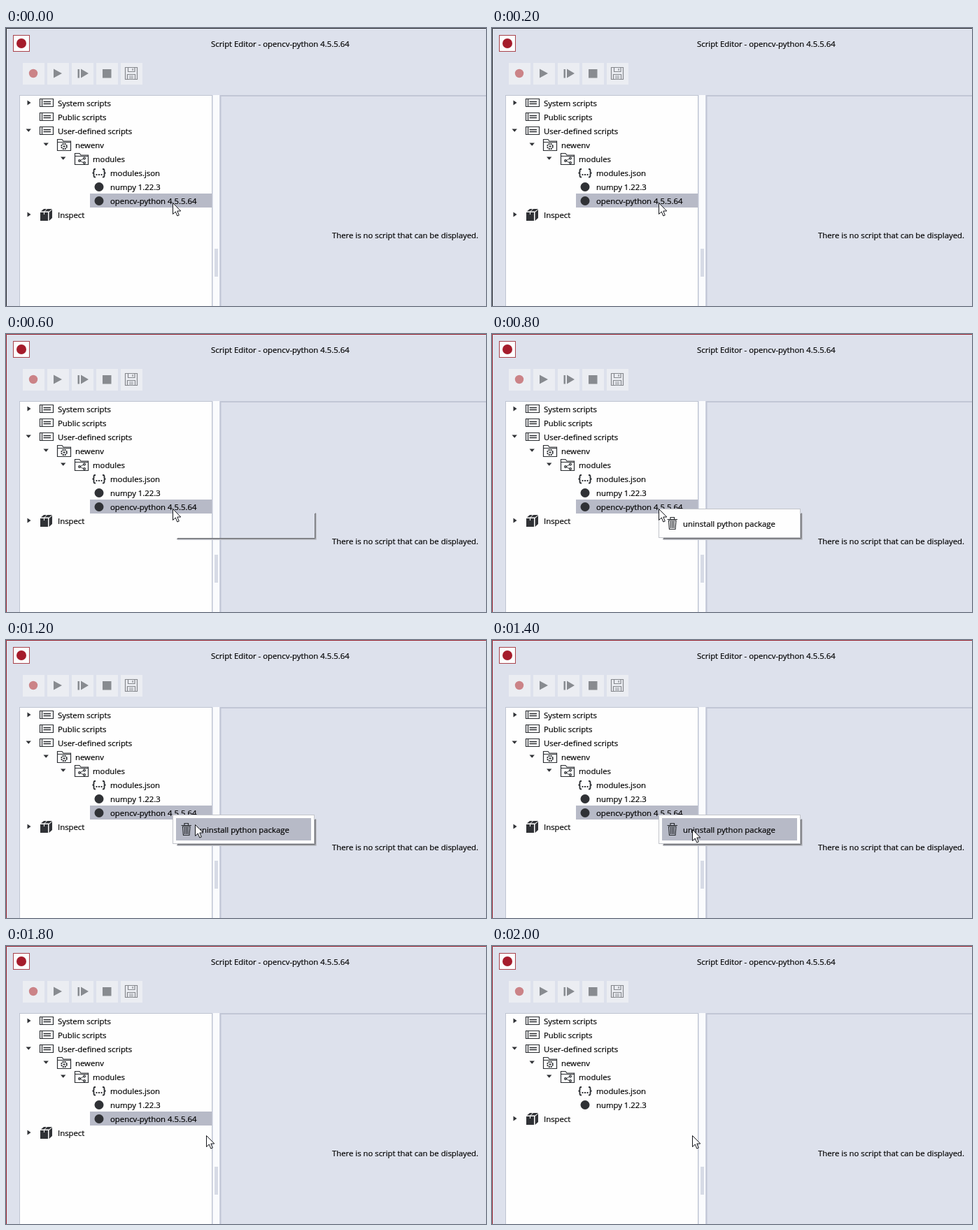
Recreate the animation shown at these times as an HTML page. Size 686 px wide and 398 px high, loop 2.4 s.

```html
<!DOCTYPE html>
<html lang="en">
<head>
<meta charset="utf-8">
<title>Script Editor</title>
<style>
html, body { margin: 0; height: 100%; overflow: hidden; background: #dde1ec; }
svg { display: block; width: 686px; height: 398px; }
text { font: 11.35px "Open Sans", "Noto Sans", sans-serif; fill: #000; stroke: #000; stroke-width: .2; white-space: pre; }
.line { fill: none; stroke: #2c2f33; stroke-width: 1.2; }
.tool { fill: #888b90; }
.dark { fill: #303236; }
</style>
</head>
<body>
<svg viewBox="0 0 686 398">
  <defs>
    <g id="card" class="line">
      <path d="M.5 .5H19.5V11.5H.5ZM3.5 .5V11.5"/>
      <path d="M5.5 4.5H16M5.5 7.5H16" stroke-width="1.4"/>
    </g>
    <g id="folder" class="line">
      <path d="M.5 16.5V.5H7L9 3H19.5V16.5ZM.5 4.5H19.5"/>
    </g>
    <path id="closed" class="dark" d="M0 0L5 3.5L0 7Z"/>
    <path id="open" class="dark" d="M0 0H7.4L3.7 4.2Z"/>
    <circle id="package" class="dark" r="6.5"/>
  </defs>

  <rect width="686" height="398" fill="#dde1ec"/>
  <path id="frame" d="M.5 398V.5H686" fill="none"/>

  <rect x="10.5" y="10.5" width="23" height="23" fill="#fdfdfd" stroke="#a8434c"/>
  <circle cx="22" cy="22" r="7" fill="#a51c2b"/>
  <text x="293" y="27">Script Editor - opencv-python 4.5.5.64</text>

  <path fill="#ebedf2" d="M24 50h31v31h-31zM59 50h31v31h-31zM94 50h31v31h-31zM129 50h31v31h-31zM164 50h31v31h-31z"/>
  <circle cx="39" cy="65" r="6.2" fill="#cb8387"/>
  <path class="tool" d="M68 58.5L80 65L68 71.500ZM102.500 59H105V71.500H102.500ZM107 58.500L118 65L107 71.500ZM138 59H150.500V71.500H138Z"/>
  <path d="M170.5 56.5H187.500V73.500H170.500ZM174.500 56.500V62.500H184V56.500M181 58V61M173.500 73.500V66.500H184.500V73.500M176 69H182M176 71.500H182" fill="none" stroke="#85888d" stroke-width="1.2"/>

  <rect x="19.5" y="96.5" width="275" height="310" fill="#fefefe" stroke="#bfc4d1"/>
  <rect x="296" y="96" width="9" height="302" fill="#fafbfd"/>
  <rect x="298" y="316" width="5" height="40" fill="#d7dbe6"/>
  <path d="M306.5 398V97H686" fill="none" stroke="#c1c6d5" stroke-width="2"/>
  <text x="466" y="301">There is no script that can be displayed.</text>

  <use href="#closed" x="30.5" y="103.5"/>
  <use href="#card" x="48" y="101"/>
  <text x="74" y="112">System scripts</text>
  <use href="#card" x="48" y="121"/>
  <text x="74" y="132">Public scripts</text>
  <use href="#open" x="28.5" y="144.5"/>
  <use href="#card" x="48" y="141"/>
  <text x="74" y="152">User-defined scripts</text>

  <use href="#open" x="53.5" y="164.5"/>
  <use href="#folder" x="73" y="159"/>
  <circle class="line" cx="83" cy="169.5" r="3.8" stroke-dasharray="2 1" style="stroke-width:2"/>
  <circle class="dark" cx="83" cy="169.5" r="1.3"/>
  <text x="99" y="172">newenv</text>

  <use href="#open" x="78" y="184.5"/>
  <use href="#folder" x="98" y="179"/>
  <path class="line" d="M111 187L105.5 190L111 193" style="stroke-width:.9"/>
  <g class="line">
    <circle cx="105" cy="190" r="1.4"/>
    <circle cx="112" cy="186.5" r="1.4"/>
    <circle cx="112" cy="193" r="1.4"/>
  </g>
  <text x="124" y="192">modules</text>

  <path class="line" d="M128 202H127Q125.5 202 125.5 204V206Q125.5 207.5 123.5 207.5Q125.5 207.5 125.5 209V212Q125.5 213.5 127 213.5H128M138 202H139Q140.5 202 140.5 204V206Q140.5 207.5 142.5 207.5Q140.5 207.5 140.5 209V212Q140.5 213.5 139 213.5H138" style="stroke-width:1.8"/>
  <path class="dark" d="M128.5 209h2v2h-2zM132 209h2v2h-2zM135.5 209h2v2h-2z"/>
  <text x="149" y="212">modules.json</text>
  <use href="#package" x="133" y="227.5"/>
  <text x="149" y="232">numpy 1.22.3</text>

  <g id="picked">
    <rect x="120" y="237" width="174" height="20" fill="#b7bac7"/>
    <use href="#package" x="133" y="247.5"/>
    <text x="149" y="252">opencv-python 4.5.5.64</text>
  </g>

  <g id="inspect">
    <use href="#closed" x="30.5" y="263.5"/>
    <path class="dark" d="M49 264H60V276H49ZM50 262.5L54 259H66L61.5 262.5ZM61.5 264L66 260V272L61.5 276Z"/>
    <path d="M54.5 263L58.5 259M54.5 263V267" stroke="#fefefe"/>
    <text x="74" y="272">Inspect</text>
  </g>

  <g id="shadow" fill="none">
    <path d="M245 294.5H443.5V257" stroke="#c3c5cc"/>
    <path d="M244 293.5H442.5V256" stroke="#97999f"/>
    <path d="M245 292.5H441.5V257" stroke="#6f7074"/>
  </g>
  <g id="menu">
    <rect x="238.5" y="250.5" width="202" height="41" fill="#fefefe" stroke="#c2c4ca"/>
    <rect id="hover" x="243" y="255" width="193" height="32" fill="#b7bac7"/>
    <path class="line" d="M250.5 265.5H265M255 265V262.5H260.500V265M252.500 267L253.500 279.500H262L263 267ZM255.500 268V278M257.800 268V278M260 268V278"/>
    <text x="273" y="276">uninstall python package</text>
  </g>
  <path id="cursor" d="M.5 .5V16.5L4.3 13L6.8 19L9.3 18L6.8 12H11.8Z" fill="#fff" stroke="#15171c"/>
</svg>
<script>
const el = id => document.getElementById(id);
const show = (id, on) => el(id).style.display = on ? "" : "none";
const LOOP = 2400, STEP = 200;

function draw(now) {
  const t = Math.floor(now % LOOP / STEP) * STEP;
  const removed = t >= 2000;
  const travel = Math.min(1, Math.max(0, (t - 800) / 600));

  el("frame").setAttribute("stroke", t < 600 ? "#25272d" : "#96212d");
  show("shadow", t >= 600 && t < 1800);
  show("menu", t >= 800 && t < 1800);
  show("hover", t >= 1000);
  show("picked", !removed);
  el("inspect").setAttribute("transform", `translate(0 ${removed ? -20 : 0})`);
  const x = Math.round(238 + 48 * travel), y = Math.round(250 + 21 * travel);
  el("cursor").setAttribute("transform", `translate(${x} ${y})`);
  requestAnimationFrame(draw);
}
draw(0);
</script>
</body>
</html>
```
